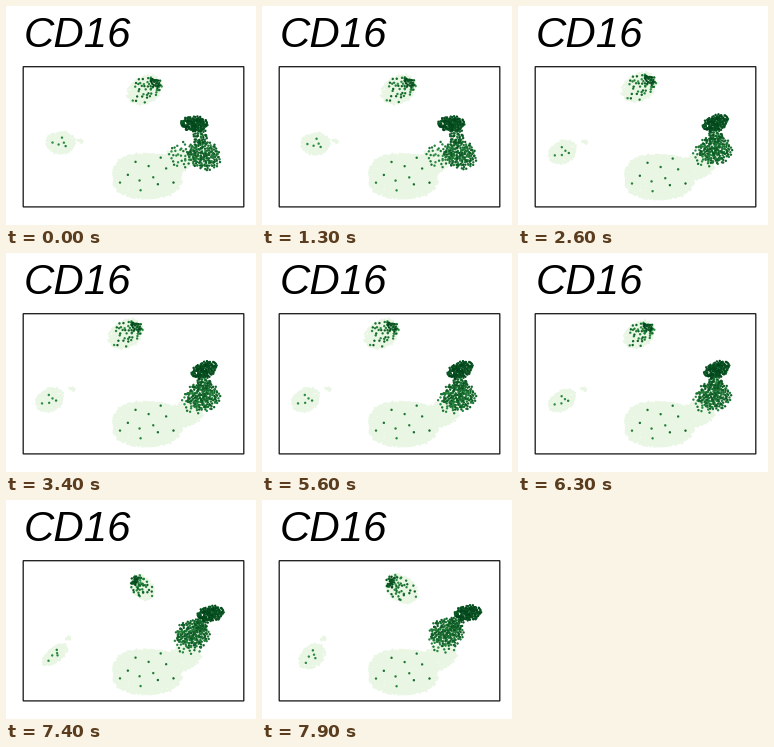
A matplotlib script for the animation above (8000 ms loop, 250 by 219 pixels).

```python
import numpy as np
import matplotlib.pyplot as plt
from matplotlib.animation import FuncAnimation
from matplotlib.colors import LinearSegmentedColormap
from matplotlib.patches import Rectangle

W, H, DPI = 250, 219, 100
PT = 72 / DPI
FRAMES, STEP_MS = 80, 100
TWEEN = 30                      # frames per transition
START_1, START_2 = 4, 55        # last still frame before each transition
GOLDEN = np.pi * (3 - 5 ** 0.5)

rng = np.random.default_rng(16)
greens = LinearSegmentedColormap.from_list(
    "cells", ["#e8f6e3", "#2f9145", "#126329", "#00441b"])
layers = []                     # (positions in the three states, levels)


def disc(n, fill, power):
    """Evenly spread points in a unit disc, or a squarer shape if power > 2."""
    i = np.arange(n)
    r = ((i + 0.5) / n) ** fill
    c, s = np.cos(i * GOLDEN), np.sin(i * GOLDEN)
    edge = (abs(c) ** power + abs(s) ** power) ** (-1 / power)
    return r * edge * np.array([c, s])


def place(unit, radii, pose, flip=1):
    """Scale the disc, turn it and move it to the pose (x, y, degrees)."""
    x, y, turn = pose
    a = np.radians(turn)
    u, v = unit[0] * radii[0], unit[1] * radii[1] * flip
    return np.column_stack([x + u * np.cos(a) - v * np.sin(a),
                            y + u * np.sin(a) + v * np.cos(a)])


def cluster(n, radii, poses, low=0, high=0, fill=0.5, power=2, mirror=1,
            chance=lambda u: 1):
    """Add n cells; 'mirror' = -1 flips the cluster over in the last state."""
    unit = disc(n, fill, power)
    states = [place(unit, radii, pose, flip)
              for pose, flip in zip(poses, (1, 1, mirror))]
    level = rng.uniform(low, high, n)
    level = np.where(rng.random(n) < chance(unit[0]), level, 0)
    layers.append((np.array(states) + rng.normal(0, 0.7, (n, 2)), level))
    return unit, level


# large cluster with its tail, and a few expressing cells in it
body = [(141, 170, 0), (141, 171, 0), (141, 172, 0)]
cluster(1700, (34, 22), body, power=2.6)
cluster(420, (19, 12), [(168, 157, -25), (178, 162, -15), (176, 158, -25)])
cluster(11, (32, 20), body, 0.4, 0.7)

# left cluster, which turns over, and its small satellite
left = [(55, 137, 0), (44, 147, -30), (50, 157, -42)]
cluster(260, (14.5, 11), left, mirror=-1)
cluster(14, (3, 1.5), [(74, 135, 0), (66, 136, 0), (61, 139, -40)])
cluster(5, (8, 6), left, 0.35, 0.5, mirror=-1)

# top cluster: expression rises towards one end
top = [(139, 84, -30), (120, 81, -32), (140, 89, -145)]
cluster(420, (18, 13), top)
cluster(100, (18, 12), top, 0.32, 0.7, chance=lambda u: 0.45 + 0.35 * u)
cluster(130, (17, 9), top, 0.65, 1, chance=lambda u: (u > 0.55) * 0.9)

# right cluster: loose fringe, lower mass, bridge, dense upper part
cluster(40, (15, 13), [(177, 149, 0), (190, 148, 0), (181, 140, 0)],
        0.33, 0.6)
cluster(190, (17, 14), [(198, 149, 25), (197, 143, 0), (184, 132, 0)],
        0.38, 0.8, fill=0.6)
cluster(45, (7, 9), [(194, 130, 0), (198, 129, 0), (194, 123, 40)],
        0.45, 0.85)
cluster(170, (13.5, 7.5), [(188, 118, 0), (198, 117, -25), (206, 113, -8)],
        0.65, 1, fill=0.55)

levels = np.concatenate([level for _, level in layers])
order = np.argsort(levels, kind="stable")       # darkest cells on top
before, middle, after = np.concatenate(
    [points for points, _ in layers], axis=1)[:, order]


def ease(t):
    """Cubic ease in and out, held at both ends."""
    t = min(max(t, 0), 1)
    return 4 * t ** 3 if t < 0.5 else 1 - 4 * (1 - t) ** 3


def positions(frame):
    k1 = ease((frame - START_1) / TWEEN)
    k2 = ease((frame - START_2) / TWEEN)
    return before + (middle - before) * k1 + (after - middle) * k2


fig = plt.figure(figsize=(W / DPI, H / DPI), dpi=DPI, facecolor="white")
ax = fig.add_axes([0, 0, 1, 1])
ax.set(xlim=(0, W), ylim=(H, 0))
ax.axis("off")
ax.text(18, 41, "CD16", family="Liberation Sans", style="italic",
        size=42 * PT, va="baseline")
dots = ax.scatter(*before.T, s=(2.4 * PT) ** 2, c=greens(levels[order]),
                  linewidths=0)
ax.add_patch(Rectangle((17.2, 60.7), 220.6, 140.2, fill=False, ec="#1a1a1a",
                       lw=1.3 * PT, zorder=3, snap=False))


def update(frame):
    dots.set_offsets(positions(frame))
    return (dots,)


anim = FuncAnimation(fig, update, frames=FRAMES, interval=STEP_MS, repeat=True)
plt.show()
```
